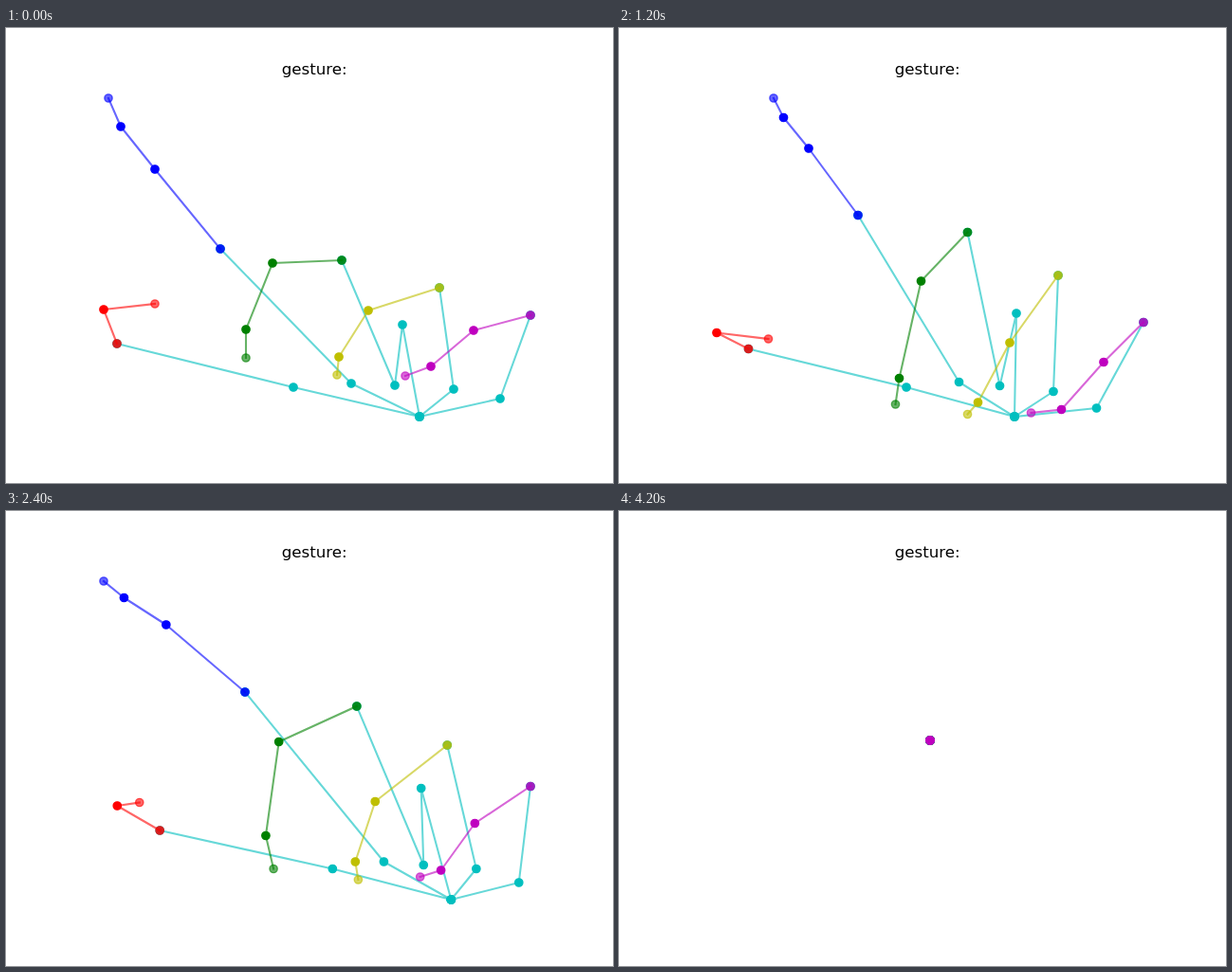
These frames come from a looping animation (640 px wide and 480 px high, 9000 ms). An HTML page:

```html
<!DOCTYPE html>
<html lang="en">
<head>
<meta charset="utf-8">
<title>Hand gesture</title>
<style>
  html, body { margin: 0; width: 100%; height: 100%; overflow: hidden; background: #fff; }
  svg { display: block; width: 640px; height: 480px; }
  text { font: 16.667px "DejaVu Sans", sans-serif; }
  path { fill: none; stroke-width: 2.083; stroke-linejoin: round; stroke-linecap: square; stroke-opacity: .6; }
  circle { stroke-width: 1.389; }
  .tip { fill-opacity: .6; stroke-opacity: .6; }
  .knuckle { opacity: .84; }
</style>
</head>
<body>
<svg viewBox="0 0 640 480">
  <text x="290.7" y="49">gesture:</text>
  <g id="hand"></g>
</svg>
<script>
const LOOP = 9000, STEP = 100, COLLAPSE = 4200;
const KEY_TIMES = [0, 800, 1600, 2000, 2800, 3400];
const BOX = { x: [103, 553], y: [74, 410] };
const PALM = '#00bfbf';

// Each row is one key pose: x, y pairs from the palm outwards.
const wrist = [[436, 410], [396, 410], [438, 410], [490, 410], [450, 410], [344, 410]];
const thumb = [
  [303, 379, 117, 333, 103, 297, 157, 291],
  [284, 383, 124, 347, 103, 332, 166, 338],
  [322, 375, 149, 330, 103, 311, 149, 318],
  [371, 382, 196, 351, 147, 330, 163, 327],
  [324, 373, 142, 323, 103, 292, 133, 288],
  [241, 359, 103, 284, 119, 245, 191, 252]
];
const index = [
  [364, 375, 226, 233, 157, 149, 121, 104, 108, 74],
  [341, 377, 242, 212, 201, 139, 181, 100, 175, 74],
  [376, 370, 262, 183, 199, 115, 166, 89, 151, 74],
  [420, 372, 264, 189, 173, 121, 126, 93, 103, 74],
  [381, 368, 250, 193, 178, 119, 138, 90, 119, 74],
  [302, 362, 270, 191, 262, 117, 254, 88, 253, 74]
];
const middle = [
  [418, 313, 410, 377, 354, 245, 281, 248, 253, 318, 253, 348],
  [408, 308, 385, 380, 360, 228, 327, 277, 303, 375, 293, 401],
  [430, 294, 418, 375, 375, 203, 310, 257, 288, 364, 290, 393],
  [447, 289, 459, 374, 374, 200, 297, 250, 295, 357, 307, 394],
  [431, 296, 424, 373, 371, 212, 287, 237, 262, 328, 266, 361],
  [401, 304, 346, 372, 387, 222, 343, 225, 278, 300, 255, 327]
];
const ring = [
  [472, 381, 457, 274, 382, 298, 351, 347, 349, 366],
  [443, 385, 459, 270, 420, 339, 383, 399, 366, 410],
  [473, 382, 467, 252, 404, 325, 374, 391, 369, 405],
  [510, 376, 466, 241, 398, 313, 386, 381, 392, 400],
  [482, 379, 466, 253, 385, 300, 356, 359, 356, 378],
  [404, 384, 472, 269, 416, 292, 349, 341, 324, 357]
];
const pinky = [
  [521, 391, 553, 303, 493, 319, 448, 357, 421, 367],
  [490, 401, 553, 316, 518, 357, 471, 405, 434, 409],
  [517, 401, 553, 305, 504, 348, 462, 400, 435, 403],
  [553, 390, 551, 285, 498, 333, 471, 387, 452, 394],
  [527, 394, 553, 296, 491, 326, 448, 371, 424, 378],
  [447, 403, 553, 316, 509, 329, 438, 364, 397, 367]
];

const hand = document.getElementById('hand');

function add(tag, attrs) {
  const node = document.createElementNS('http://www.w3.org/2000/svg', tag);
  for (const name in attrs) node.setAttribute(name, attrs[name]);
  return hand.appendChild(node);
}

const line = color => add('path', { stroke: color });
const dot = (color, kind = '') => add('circle', { r: 4.167, fill: color, stroke: color, class: kind });

// `knuckle` is the joint where the palm colour gives way to the finger colour.
const fingers = [
  { poses: thumb, color: '#ff0000', knuckle: 2 },
  { poses: index, color: '#0000ff', knuckle: 2 },
  { poses: middle, color: '#008000', knuckle: 3 },
  { poses: ring, color: '#bfbf00', knuckle: 2 },
  { poses: pinky, color: '#bf00bf', knuckle: 2 }
];

for (const f of fingers) f.palmLine = line(PALM);
for (const f of fingers) {
  const joints = f.poses[0].length / 2;
  f.palmDots = Array.from({ length: f.knuckle + 1 }, () => dot(PALM));
  f.line = line(f.color);
  f.dots = [];
  for (let j = f.knuckle; j <= joints; j++) {
    f.dots.push(dot(f.color, j === joints ? 'tip' : j === f.knuckle ? 'knuckle' : ''));
  }
}

function blend(poses, time) {
  const last = KEY_TIMES.length - 1;
  if (time >= KEY_TIMES[last]) return poses[last];
  const next = KEY_TIMES.findIndex(t => t > time);
  const from = KEY_TIMES[next - 1];
  const k = (time - from) / (KEY_TIMES[next] - from);
  return poses[next - 1].map((v, i) => v + (poses[next][i] - v) * k);
}

function toPoints(flat) {
  const points = [];
  for (let i = 0; i < flat.length; i += 2) points.push({ x: flat[i], y: flat[i + 1] });
  return points;
}

// Every pose is scaled to fill the same box; a collapsed one sits at its centre.
function fit(points, axis, collapsed) {
  const [low, high] = BOX[axis];
  const values = points.map(p => p[axis]);
  const min = Math.min(...values), span = Math.max(...values) - min;
  for (const p of points) {
    p[axis] = collapsed ? (low + high) / 2 : low + (p[axis] - min) / span * (high - low);
  }
}

function trace(path, points) {
  path.setAttribute('d', 'M' + points.map(p => `${p.x} ${p.y}`).join('L'));
}

function place(dots, points) {
  dots.forEach((d, i) => {
    d.setAttribute('cx', points[i].x);
    d.setAttribute('cy', points[i].y);
  });
}

function draw(time) {
  const root = toPoints(blend(wrist, time))[0];
  const chains = fingers.map(f => [root, ...toPoints(blend(f.poses, time))]);
  const all = [...new Set(chains.flat())];
  fit(all, 'x', time >= COLLAPSE);
  fit(all, 'y', time >= COLLAPSE);
  fingers.forEach((f, i) => {
    const palm = chains[i].slice(0, f.knuckle + 1);
    const finger = chains[i].slice(f.knuckle);
    trace(f.palmLine, palm);
    trace(f.line, finger);
    place(f.palmDots, palm);
    place(f.dots, finger);
  });
}

const start = performance.now();
function tick() {
  const elapsed = (performance.now() - start) % LOOP;
  draw(Math.floor(elapsed / STEP) * STEP);
  requestAnimationFrame(tick);
}
tick();
</script>
</body>
</html>
```
